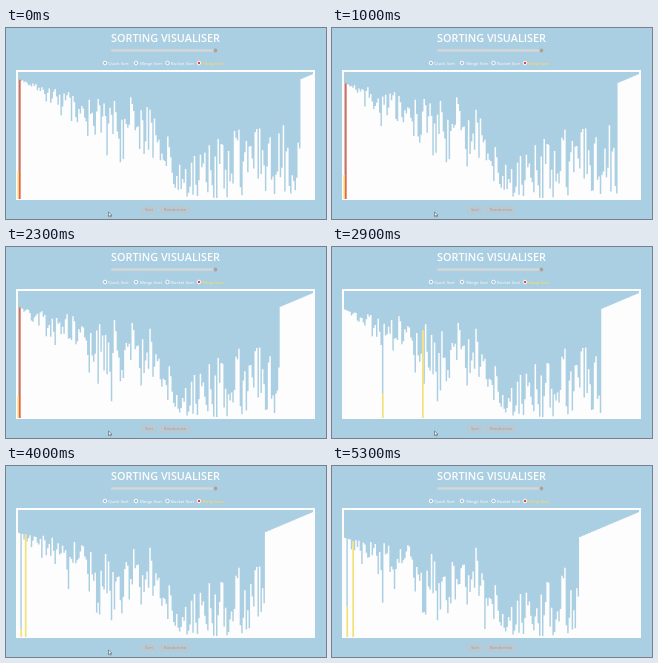
Animation of 320x191 px, one loop 5400 ms. Source, as an HTML page with a canvas:

```html
<!DOCTYPE html>
<html lang="en">
<head>
<meta charset="utf-8">
<title>Sorting Visualiser</title>
<style>
  html, body { margin: 0; width: 100%; height: 100%; overflow: hidden; background: #abcfe2; }
  canvas, svg { position: absolute; left: 0; top: 0; width: 320px; height: 191px; }
  text { font-family: "Open Sans", "Noto Sans", sans-serif; text-anchor: middle; fill: #fdfdfd; }
  .title { font-size: 10.8px; font-weight: 600; }
  .small { font-size: 4.3px; }
  .chosen { fill: #f8da62; font-weight: 600; }
  .button { fill: #b8958a; }
</style>
</head>
<body>
<canvas id="stage" width="320" height="191"></canvas>
<svg viewBox="0 0 320 191">
  <text class="title" x="159.5" y="14.4">SORTING VISUALISER</text>
  <rect x="105" y="21.3" width="107" height="2.4" rx="1" fill="#d3d6d7"/>
  <circle cx="209.5" cy="22.5" r="2" fill="#a8a39f"/>
  <g fill="#9fc0d2" stroke="#fdfdfd">
    <circle cx="99" cy="35" r="1.8"/>
    <circle cx="130" cy="35" r="1.8"/>
    <circle cx="161.5" cy="35" r="1.8"/>
    <circle cx="193" cy="35" r="1.8" fill="#e0483c"/>
  </g>
  <g class="small">
    <text x="112.5" y="36.7">Quick Sort</text>
    <text x="145" y="36.7">Merge Sort</text>
    <text x="176.5" y="36.7">Bucket Sort</text>
    <text class="chosen" x="207" y="36.7">Heap Sort</text>
  </g>
  <g fill="#b7c9d3">
    <rect x="135" y="178" width="16" height="8" rx="1"/>
    <rect x="154" y="178" width="30" height="8" rx="1"/>
  </g>
  <g class="small">
    <text class="button" x="143" y="183.3">Sort</text>
    <text class="button" x="169" y="183.3">Randomise</text>
  </g>
  <path id="cursor" d="M102.5 184v4.6l1.1-1 .8 1.5.8-.4-.7-1.4h1.5z" fill="#fdfdfd" stroke="#4b5a64" stroke-width=".6"/>
</svg>
<script>
const ctx = document.getElementById("stage").getContext("2d");
const cursor = document.getElementById("cursor");
const COUNT = 200, HEAP = 192, LOOP = 5400, STEP = 100;
const LEFT = 11.4, BAR = 1.482, BASE = 171, UNIT = 0.625;
const SKY = "#abcfe2", WHITE = "#fdfdfd", YELLOW = "#f3e27c", RED = "#e2654c";
const SORT_RATE = 6.08 / 1000; // extractions per ms
const STAGES = 8;              // one swap and seven sift steps per extraction

// Key points of the bar tops: slot, highest y, lowest y.
const outline = [[0, 50, 51], [26, 63, 82], [50, 70, 118], [77, 64, 126], [100, 86, 138],
  [104, 128, 160], [130, 108, 167], [155, 90, 165], [HEAP, 98, 156]];

function randomizer(seed) {
  return () => (seed = seed * 16807 % 2147483647) / 2147483647;
}

function topRange(slot) {
  const k = outline.findIndex(point => point[0] > slot);
  const from = outline[k - 1], to = outline[k];
  const u = (slot - from[0]) / (to[0] - from[0]);
  return [1, 2].map(n => from[n] + (to[n] - from[n]) * u);
}

// Random tops within the outline, ranked into the values 1..HEAP; the tail is sorted.
function makeHeap() {
  const random = randomizer(4217);
  const tops = Array.from({ length: HEAP }, (_, i) => {
    const [high, low] = topRange(i);
    return high + (low - high) * Math.pow(random(), 1.15);
  });
  for (let i = HEAP - 1; i > 0; i--) {
    const parent = (i - 1) >> 1;
    tops[parent] = Math.min(tops[parent], tops[i] - 0.5);
  }
  const values = Array.from({ length: COUNT }, (_, i) => i + 1);
  tops.map((_, i) => i).sort((a, b) => tops[b] - tops[a])
    .forEach((slot, rank) => { values[slot] = rank + 1; });
  return values;
}

function sortTo(progress) {
  const a = start.slice(), current = Math.floor(progress);
  const stage = Math.floor((progress - current) * STAGES);
  let marks = [];
  const swap = (i, j) => { [a[i], a[j]] = [a[j], a[i]]; };
  for (let k = 0; k <= current; k++) {
    const size = HEAP - 1 - k, limit = k < current ? Infinity : stage;
    swap(0, size);
    marks = [[0, YELLOW], [1, RED]];
    for (let i = 0, step = 1; step <= limit; step++) {
      let child = 2 * i + 1;
      if (child + 1 < size && a[child + 1] > a[child]) child++;
      if (child >= size || a[child] <= a[i]) break;
      marks = [[i, YELLOW], [child, YELLOW]];
      if (step === limit) break;
      swap(i, child);
      i = child;
    }
  }
  return { values: a, marks };
}

function draw(time) {
  const { values, marks } = sortTo(0.03 + time * SORT_RATE);
  const addBar = (i, width) => {
    const height = values[i] * UNIT;
    ctx.rect(LEFT + i * BAR, BASE - height, width, height);
  };
  ctx.fillStyle = SKY;
  ctx.fillRect(0, 0, 320, 191);
  ctx.strokeStyle = WHITE;
  ctx.lineWidth = 2;
  ctx.strokeRect(11, 43, 297, 128);
  ctx.beginPath();
  values.forEach((_, i) => addBar(i, BAR));
  ctx.fillStyle = WHITE;
  ctx.fill();
  for (const [i, color] of marks) {
    ctx.beginPath();
    addBar(i, BAR + 0.3);
    ctx.fillStyle = color;
    ctx.fill();
  }
  cursor.style.display = time < 4100 ? "" : "none";
}

const start = makeHeap();
const began = performance.now();
let shown = -1;
function tick() {
  const time = Math.floor((performance.now() - began) % LOOP / STEP) * STEP;
  if (time !== shown) draw(shown = time);
  requestAnimationFrame(tick);
}
tick();
</script>
</body>
</html>
```
